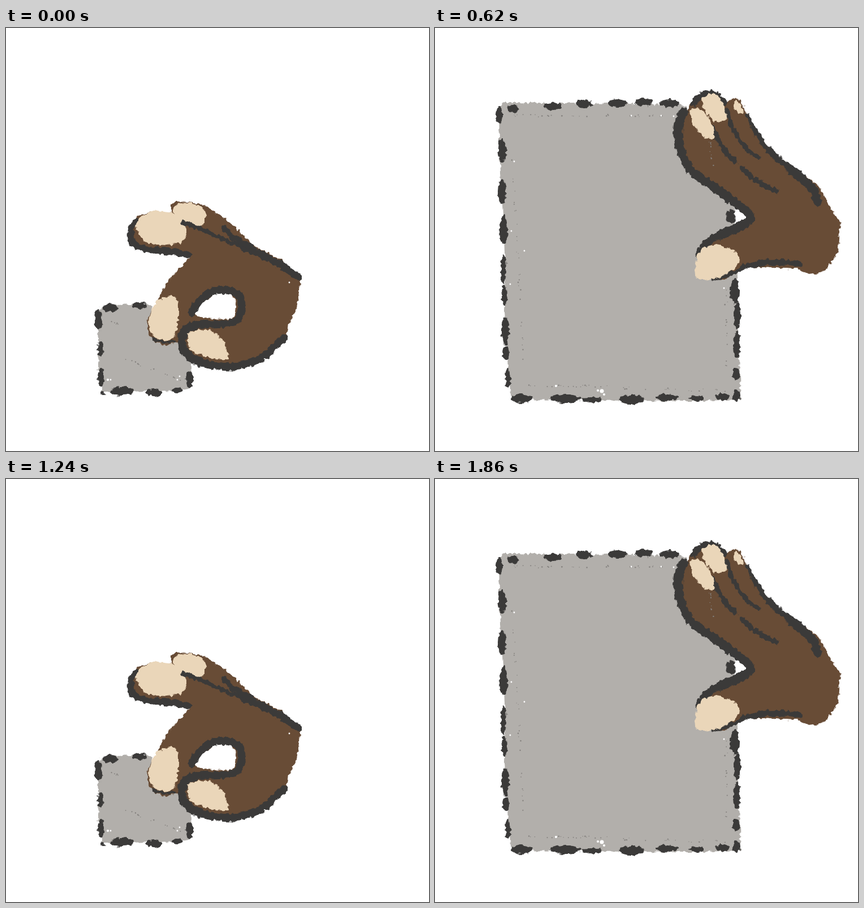
An HTML page with a canvas for the animation above (2170 ms loop, 748 px wide and 748 px high).

```html
<!DOCTYPE html>
<html lang="en">
<head>
<meta charset="utf-8">
<title>Hand pulling a card</title>
<style>
html, body { margin: 0; width: 100%; height: 100%; overflow: hidden; background: #fff; }
canvas { display: block; }
</style>
</head>
<body>
<canvas id="stage" width="748" height="748"></canvas>
<script>
const SIZE = 748, STEP = 310;
const GRAY = '#b2afab', BROWN = '#684c36', CREAM = '#ead6b9', DARK = '#3b3a39', WHITE = '#fff';
const ORDER = [0, 1, 2, 1, 0, 1, 2];

// dashes: x, y, rx, ry; lines: [width, path]; seams: x1, y1, x2, y2, count
const small = {
  card: 'M166 494 L182 489 L246 488 L262 495 L330 560 L328 600 L326 636 L300 642 L172 645 L163 605 L164 550 L162 520Z',
  dashes: [[183,495,14,7], [236,491,13,6], [163,516,7,19], [167,566,5,13], [168,617,6,17],
    [205,642,21,8], [262,644,14,7], [303,641,10,5], [325,622,6,14], [172,646,3,3]],
  hand: 'M292 312 L300 308 Q330 306 350 314 Q372 327 390 340 Q420 362 438 386 L480 405 L521 440 ' +
    'L518 475 Q508 510 497 530 L495 548 Q470 575 440 592 Q400 606 350 598 Q312 590 304 555 ' +
    'L285 562 Q256 560 250 530 Q248 505 270 482 Q280 450 300 432 L326 405 Q290 400 262 398 ' +
    'Q220 396 215 365 Q218 340 240 330 Q262 322 292 326Z',
  gap: 'M335 509 Q335 497 347 486 Q361 472 385 466 Q403 470 407 488 Q408 506 400 514 Q370 517 335 509Z',
  nails: [
    'M230 352 Q235 326 270 323 Q308 325 318 343 Q323 365 312 378 Q300 386 265 383 Q235 380 230 352Z',
    'M294 322 Q300 308 325 309 Q352 313 354 332 Q352 347 345 352 Q325 348 318 343 L310 336 Q296 332 294 322Z',
    'M285 475 Q305 470 305 492 Q306 530 296 548 Q285 557 265 548 Q248 535 254 508 Q262 478 285 475Z',
    'M322 540 Q345 528 368 537 Q392 555 393 584 Q390 590 372 585 Q335 578 325 568 Q318 552 322 540Z'],
  lines: [
    [13, 'M329 503 Q342 475 365 466 Q390 459 408 470 Q421 484 416 503 Q412 521 390 523 Q360 524 338 525'],
    [16, 'M338 525 Q311 529 310 555 Q313 580 345 591'],
    [13, 'M335 588 Q370 600 405 599 Q440 593 462 576 L491 548'],
    [12, 'M231 343 Q216 355 221 376 Q230 391 265 393 Q300 395 322 401'],
    [7, 'M313 344 Q350 357 385 373 L430 392'],
    [13, 'M420 388 Q468 404 517 440'],
    [10, 'M384 353 Q400 373 432 386'],
    [5, 'M259 548 Q275 560 298 554']],
  seams: [[185,520,203,524,5], [200,580,310,625,14]],
  holes: [[180,622,3], [185,622,2], [303,622,2], [307,616,2], [501,450,2]]
};

const middle = {
  card: 'M71 278 L110 274 L180 268 L290 267 L395 360 L402 400 L330 530 L230 539 L95 540 L91 500 L86 420 L80 330Z',
  dashes: [[97,279,16,6], [166,274,20,7], [234,277,19,6], [268,276,14,5], [80,298,8,17],
    [86,348,7,18], [85,410,6,20], [85,438,4,12], [87,465,6,10], [91,504,6,13],
    [108,541,14,7], [161,532,13,7], [219,532,16,8], [270,531,18,7], [312,524,8,8],
    [392,376,7,12], [397,401,7,9]],
  hand: 'M306 215 Q306 195 325 191 Q350 192 365 208 L380 210 Q395 203 410 214 Q440 250 460 290 ' +
    'L500 318 Q540 350 555 390 L568 436 L578 455 Q578 475 565 480 Q550 505 525 516 L503 528 ' +
    'L484 514 L473 524 Q430 526 400 531 Q380 550 355 552 Q328 550 326 532 L318 520 ' +
    'Q330 480 360 458 Q415 425 418 405 Q415 375 385 358 Q330 337 300 317 Q280 300 280 275 ' +
    'Q285 255 300 255 L325 258 Q306 245 306 215Z',
  gap: 'M402 378 L410 394 L410 408 L401 417Z',
  nails: [
    'M325 205 Q335 192 352 199 Q378 215 388 240 Q390 252 378 252 Q350 248 335 230 Q322 215 325 205Z',
    'M288 268 Q291 254 305 257 L322 262 Q345 266 356 275 Q365 286 360 294 Q347 300 325 296 Q297 291 288 268Z',
    'M331 525 Q345 507 380 503 Q405 505 403 517 Q390 530 350 540 Q330 542 331 525Z'],
  lines: [
    [12, 'M292 272 Q294 292 320 310 L380 347 Q420 375 418 405 Q410 428 375 448'],
    [13, 'M390 438 Q362 456 349 470 Q325 496 320 522'],
    [11, 'M347 198 Q324 190 315 215 Q313 245 335 259 Q353 266 375 277'],
    [11, 'M358 273 Q407 285 434 310'],
    [6, 'M290 268 Q308 260 325 266'],
    [6, 'M405 258 Q430 272 448 302'],
    [12, 'M380 211 Q400 207 412 222 Q435 258 457 290 Q500 318 528 350'],
    [14, 'M528 350 Q550 385 560 436'],
    [12, 'M330 537 Q340 550 362 546 Q376 543 382 538'],
    [10, 'M388 531 Q425 520 478 524']],
  seams: [[95,293,285,286,22], [108,300,110,510,14], [100,515,315,517,24], [95,330,95,520,12]],
  holes: [[137,276,2], [185,286,2], [200,285,2], [99,413,2], [170,517,2], [236,515,2],
    [385,420,2], [90,436,3], [90,450,3]]
};

const large = {
  card: 'M112 141 L122 132 L440 135 L530 320 L535 440 L540 657 L450 660 L135 657 L128 600 L122 500 L125 440 L120 330 L113 200Z',
  dashes: [[138,143,11,6], [208,138,16,7], [264,134,14,7], [323,133,16,7], [369,131,16,7],
    [415,133,18,7], [114,154,6,16], [119,216,7,20], [119,290,7,22], [121,357,7,26],
    [121,427,5,25], [123,472,5,18], [124,537,7,25], [125,575,5,12], [129,619,5,17],
    [153,655,19,8], [230,656,27,7], [276,657,18,5], [348,657,22,8], [410,653,20,6],
    [463,655,14,5], [509,652,12,6], [533,650,7,10], [530,465,8,22], [535,508,6,24],
    [534,560,6,24], [532,611,6,12], [523,333,9,13]],
  hand: 'M432 180 Q440 145 460 125 L475 112 Q495 110 515 132 L528 123 Q545 128 550 150 L570 185 ' +
    'L610 240 L650 258 Q680 275 695 310 L717 345 L714 390 Q700 430 670 436 L640 426 L555 422 ' +
    'Q530 430 510 445 L470 440 Q460 420 466 395 Q480 370 550 350 Q560 335 530 315 L470 270 ' +
    'Q425 240 432 180Z',
  gap: 'M529 323 Q538 322 546 338 L541 346 L530 349Z',
  nails: [
    'M450 145 Q465 135 480 152 Q495 175 493 193 Q485 199 474 193 Q452 175 450 145Z',
    'M472 125 Q480 113 495 116 Q515 130 516 160 Q510 170 495 165 Q473 150 472 125Z',
    'M528 130 Q540 124 546 148 Q540 155 531 145Z',
    'M463 405 Q465 390 485 384 Q500 380 512 389 Q535 390 540 410 Q530 430 505 440 Q475 448 462 443 Q458 425 463 405Z'],
  lines: [
    [16, 'M439 149 Q426 170 432 205 Q438 245 470 266 Q500 285 535 312'],
    [16, 'M525 305 Q560 325 557 340 Q540 352 505 366'],
    [13, 'M520 360 Q475 373 467 401'],
    [11, 'M458 133 Q464 117 489 115'],
    [8, 'M489 115 Q507 120 513 133'],
    [9, 'M490 174 Q502 208 530 236'],
    [7, 'M516 145 Q530 205 572 230'],
    [9, 'M543 248 Q570 275 602 288'],
    [8, 'M553 155 Q565 185 592 220'],
    [12, 'M590 215 Q625 250 650 262'],
    [15, 'M630 254 Q670 275 677 308'],
    [7, 'M490 444 Q520 438 545 424'],
    [10, 'M545 423 Q590 408 645 418']],
  seams: [[140,155,425,155,30], [137,220,157,600,28], [145,630,520,642,40], [515,450,515,620,14], [485,200,495,255,10]],
  holes: [[140,236,2], [135,359,2], [158,394,2], [133,453,2], [214,633,3], [295,642,5],
    [288,641,3], [299,648,3], [347,155,2], [400,155,2], [422,156,2], [511,460,2]]
};

function random(seed) {
  return () => (seed = (seed * 16807) % 2147483647) / 2147483647;
}

function surface() {
  const c = document.createElement('canvas');
  c.width = c.height = SIZE;
  return c;
}

function dot(g, x, y, rx, ry, color) {
  g.fillStyle = color;
  g.beginPath();
  g.ellipse(x, y, rx, ry, 0, 0, Math.PI * 2);
  g.fill();
}

function fill(g, path, color) {
  g.fillStyle = color;
  g.fill(new Path2D(path));
}

// Smooth noise on a coarse grid, in -1..1
function noise(seed, cell) {
  const rnd = random(seed), n = Math.ceil(SIZE / cell) + 2;
  const grid = Array.from({ length: n * n }, () => rnd() * 2 - 1);
  return (x, y) => {
    const i = Math.floor(x / cell), j = Math.floor(y / cell);
    const u = x / cell - i, v = y / cell - j, k = j * n + i;
    const a = grid[k] + (grid[k + 1] - grid[k]) * u;
    const b = grid[k + n] + (grid[k + n + 1] - grid[k + n]) * u;
    return a + (b - a) * v;
  };
}

// Shift pixels by noise to give ragged chalk edges
function roughen(canvas, amount) {
  const g = canvas.getContext('2d');
  const from = g.getImageData(0, 0, SIZE, SIZE), to = g.createImageData(SIZE, SIZE);
  const a = new Uint32Array(from.data.buffer), b = new Uint32Array(to.data.buffer);
  const dx = noise(71, 4), dy = noise(913, 4);
  const clamp = v => Math.max(0, Math.min(SIZE - 1, Math.round(v)));
  for (let y = 0; y < SIZE; y++) {
    for (let x = 0; x < SIZE; x++) {
      b[y * SIZE + x] = a[clamp(y + dy(x, y) * amount) * SIZE + clamp(x + dx(x, y) * amount)];
    }
  }
  g.putImageData(to, 0, 0);
}

function render(pose, index) {
  const canvas = surface(), g = canvas.getContext('2d'), rnd = random(500 + index);
  g.fillStyle = WHITE;
  g.fillRect(0, 0, SIZE, SIZE);
  g.lineCap = g.lineJoin = 'round';
  fill(g, pose.card, GRAY);
  for (const d of pose.dashes) dot(g, ...d, DARK);
  fill(g, pose.hand, BROWN);
  fill(g, pose.gap, WHITE);
  g.strokeStyle = DARK;
  for (const [width, path] of pose.lines) {
    g.lineWidth = width;
    g.stroke(new Path2D(path));
  }
  for (const path of pose.nails) fill(g, path, CREAM);
  if (index === 0) {
    g.lineWidth = 7;
    g.stroke(new Path2D('M313 344 Q325 347 350 357'));
  }
  if (index === 1) {
    g.lineWidth = 6;
    g.stroke(new Path2D('M290 268 Q303 262 315 265 Q345 262 358 273'));
  }
  roughen(canvas, 2.6);
  for (const [x1, y1, x2, y2, count] of pose.seams) {
    for (let i = 0; i < count; i++) {
      const t = rnd();
      const r = 0.6 + rnd() * 0.7;
      dot(g, x1 + (x2 - x1) * t + rnd() * 5 - 2.5, y1 + (y2 - y1) * t + rnd() * 5 - 2.5, r, r, '#85827f');
    }
  }
  for (const [x, y, size] of pose.holes) dot(g, x, y, size * 0.7, size * 0.7, WHITE);
  return canvas;
}

const poses = [small, middle, large].map(render);
const ctx = document.getElementById('stage').getContext('2d');
const start = performance.now();
let shown = -1;

function draw(now) {
  const step = Math.floor(Math.max(0, now - start) / STEP) % ORDER.length;
  if (ORDER[step] !== shown) {
    shown = ORDER[step];
    ctx.drawImage(poses[shown], 0, 0);
  }
  requestAnimationFrame(draw);
}
draw(start);
</script>
</body>
</html>
```
